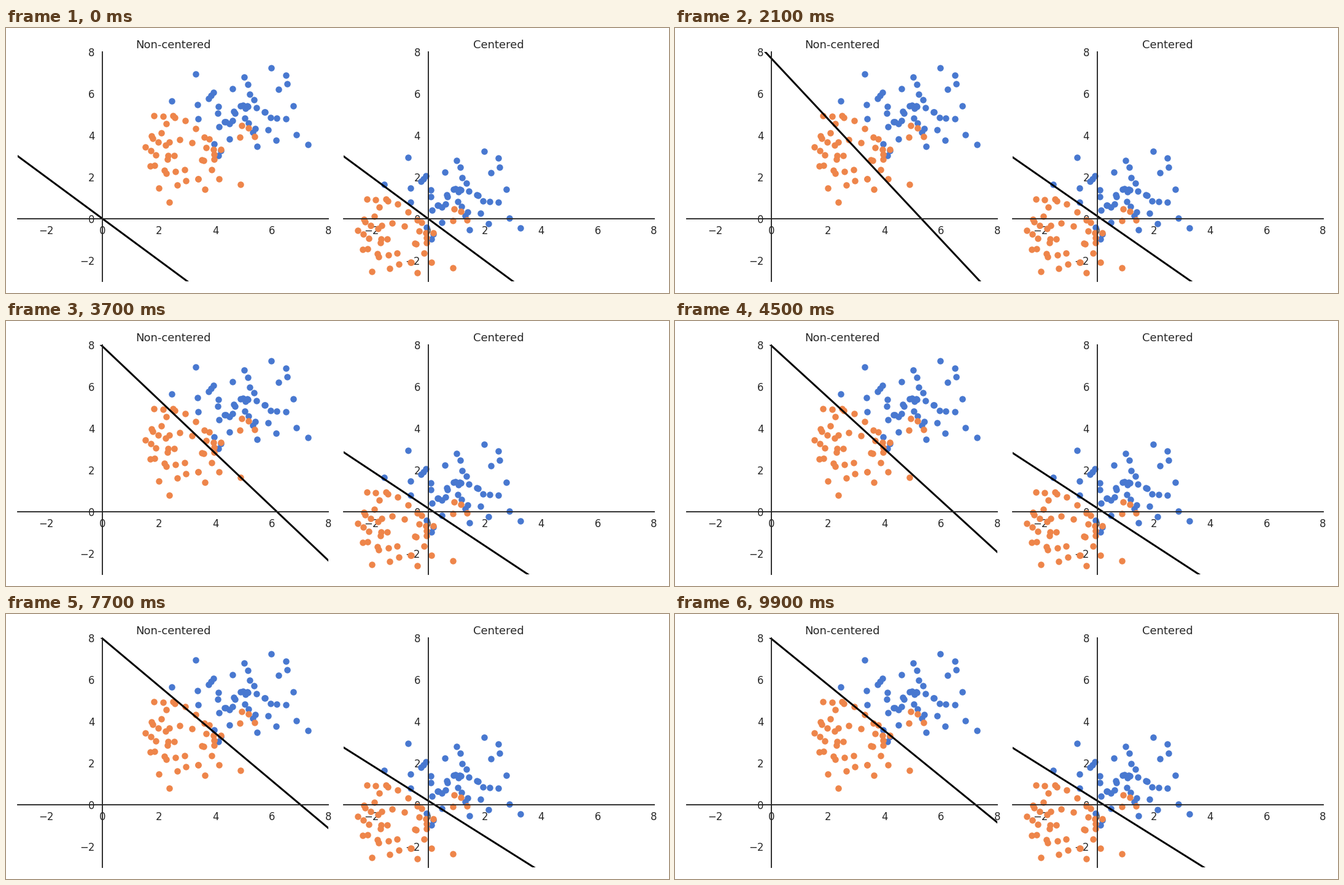
A matplotlib script that plays this animation: 1080x432 px, repeating every 10 s.

```python
import numpy as np
import matplotlib.pyplot as plt
from matplotlib.animation import FuncAnimation

W, H, DPI = 1080, 432, 108
FRAMES, INTERVAL = 100, 100
BLUE, ORANGE, INK = "#4878D0", "#EE854A", "0.15"
X_LIM = np.array([-3, 8])
SHIFT = 4

plt.rcParams["font.family"] = "DejaVu Sans"


def raw_boundary(step, x):
    """Swings up quickly, then closes in on the midpoint like 1 / step."""
    ramp = 1 - np.exp(-(step / 6) ** 2)
    slope = 1 + ramp * (15.5 / (step + 10.8) - 0.04)
    gap = 1 / (0.0224 * step + 0.125 * np.exp(-step / 6))
    return SHIFT - gap - slope * (x - SHIFT)


def centered_boundary(step, x):
    """Relaxes gently towards its final slope and intercept."""
    slope = 1 - 0.157 * (1 - np.exp(-step / 22.5)) ** 2
    intercept = 0.195 * (1 - np.exp(-step / 19))
    return intercept - slope * x


def add_panel(fig, left, title, shift):
    top, bottom, width = 39, 412.8, 506
    ax = fig.add_axes([left / W, 1 - bottom / H, width / W, (bottom - top) / H])
    ticks = range(-2, 9, 2)
    ax.set(xlim=X_LIM, ylim=X_LIM, xticks=ticks, yticks=ticks)
    ax.patch.set_visible(False)
    ax.set_axisbelow(True)
    ax.set_title(title, fontsize=12, color=INK, pad=4)
    ax.tick_params(length=0, labelsize=11, labelcolor=INK)
    ax.tick_params(axis="x", pad=7.3)
    ax.tick_params(axis="y", pad=8.4)
    ax.spines[["top", "right"]].set_visible(False)
    for side in ("left", "bottom"):
        ax.spines[side].set(color=INK, linewidth=1.25)
        ax.spines[side].set_position("zero")
    for points, color in ((upper, BLUE), (lower, ORANGE)):
        ax.scatter(*(points - shift).T, s=36, color=color, linewidths=1)
    return ax.plot([], [], color="black", linewidth=2)[0]


rng = np.random.RandomState(0)
upper = rng.randn(50, 2) + SHIFT + 1
lower = rng.randn(50, 2) + SHIFT - 1

fig = plt.figure(figsize=(W / DPI, H / DPI), dpi=DPI, facecolor="white")
panels = [
    (add_panel(fig, 19.2, "Non-centered", 0), raw_boundary),
    (add_panel(fig, 549.6, "Centered", SHIFT), centered_boundary),
]


def update(step):
    for line, boundary in panels:
        line.set_data(X_LIM, boundary(step, X_LIM))
    return [line for line, _ in panels]


animation = FuncAnimation(fig, update, frames=FRAMES, interval=INTERVAL,
                          repeat=True, repeat_delay=0)
plt.show()
```
